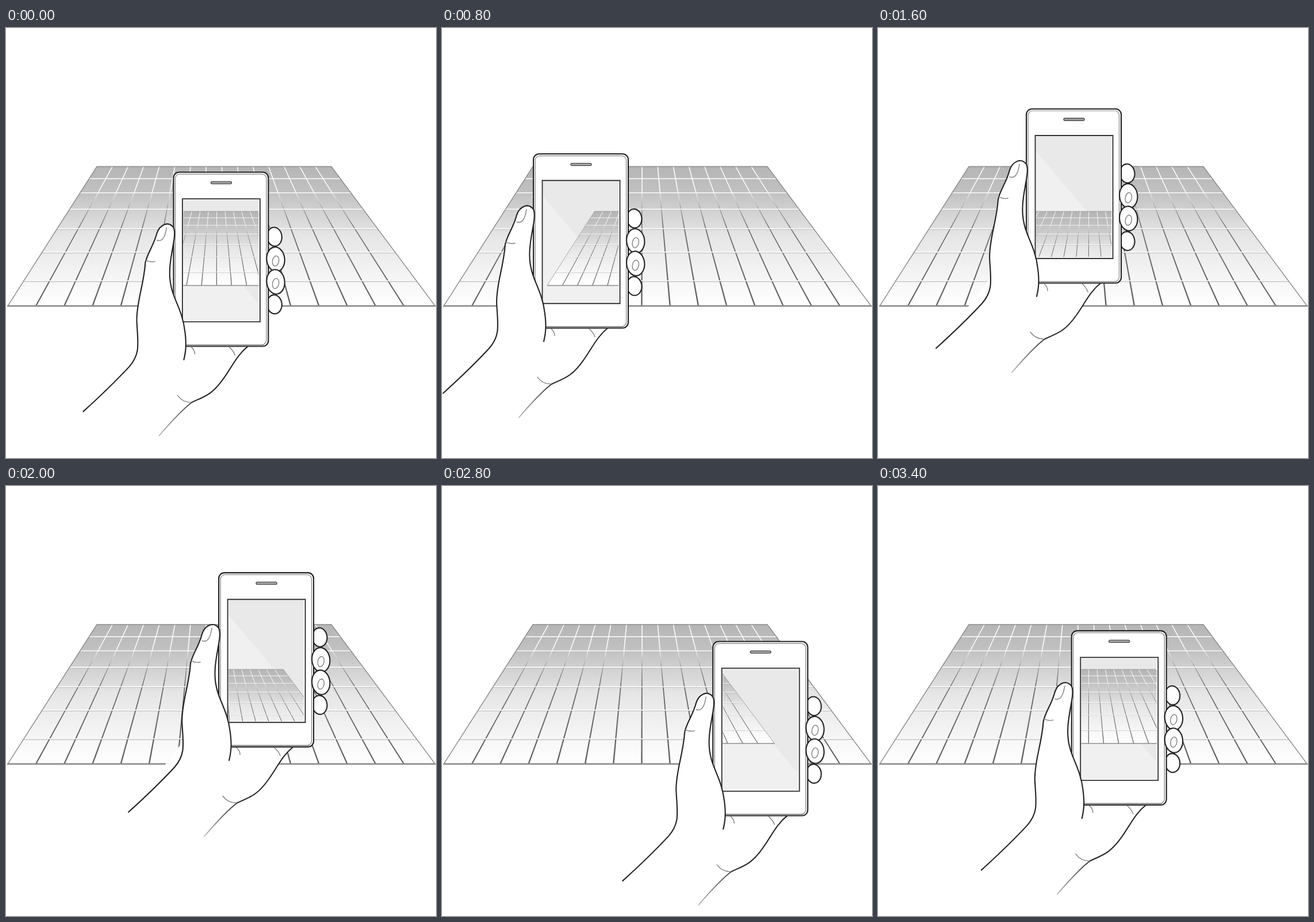
Write an HTML page with a canvas that moves like this. It is 748 px wide and 748 px high and loops after 3600 ms.

```html
<!DOCTYPE html>
<html lang="en">
<head>
<meta charset="utf-8">
<title>Phone over a floor grid</title>
<style>
html, body { margin: 0; width: 100%; height: 100%; overflow: hidden; background: #fff; }
canvas { display: block; width: 748px; height: 748px; }
</style>
</head>
<body>
<canvas id="stage" width="748" height="748"></canvas>
<script>
const ctx = document.getElementById('stage').getContext('2d');
const LOOP = 3600, STEP = 200;
const INK = '#222', GRAY = '#808080';

// The hand drifts on a closed curve: a mean plus cosine and sine harmonics.
const driftX = harmonics(22.1, [-14.2, -9.6, 7.4, -0.3, 1.1, -3.1], [-154, 16.2, 8.7, -2.3, -4.1, -1.5]);
const driftY = harmonics(-34.4, [60.6, -17.6, -8.9, 0.7, 1.8, 1.9], [-19.8, -1.4, 2.3, 4.5, 1.4, -2.1]);

function harmonics(mean, cosines, sines) {
  return angle => cosines.reduce((sum, c, i) =>
    sum + c * Math.cos((i + 1) * angle) + sines[i] * Math.sin((i + 1) * angle), mean);
}

const thumb = new Path2D(`M131 663 C152 644 185 613 211 585 C231 562 226 545 224 505
  C224 470 236 445 239 404 C243 386 253 376 259 353 C264 338 279 331 288 343
  C296 360 274 405 284 446 C288 468 304 488 308 525 C311 548 309 560 306 573`);
const palmCurve = 'C341 637 354 635 374 607 C390 585 398 565 418 549';
const palmEdge = new Path2D('M320 647' + palmCurve);
const wristEdge = new Path2D('M320 647 Q300 662 263 705');
const palm = new Path2D('M284 350 L226 540 131 663 263 705 Q300 662 320 647' + palmCurve + 'Z');
const creases = new Path2D(`M259 365 Q272 370 276 343 M240 400 Q248 404 256 402
  M319 551 Q325 556 325 563 M385 551 Q392 557 395 565 M295 635 Q304 647 318 647`);

function shape(path, fill, color, width) {
  if (fill) {
    ctx.fillStyle = fill;
    ctx.fill(path);
  }
  if (color) {
    ctx.strokeStyle = color;
    ctx.lineWidth = width;
    ctx.stroke(path);
  }
}

function polygon(...points) {
  return new Path2D('M' + points.join(' ') + 'Z');
}

function line(x1, y1, x2, y2, color, width) {
  shape(new Path2D(`M${x1} ${y1}L${x2} ${y2}`), null, color, width);
}

function roundRect(x, y, w, h, r) {
  const path = new Path2D();
  path.roundRect(x, y, w, h, r);
  return path;
}

function ellipse(x, y, rx, ry, tilt) {
  const path = new Path2D();
  path.ellipse(x, y, rx, ry, tilt, 0, 2 * Math.PI);
  return path;
}

function vertical(y1, y2, stops) {
  const gradient = ctx.createLinearGradient(0, y1, 0, y2);
  stops.forEach(([at, color]) => gradient.addColorStop(at, color));
  return gradient;
}

const TOP = 241, BOTTOM = 483.5, LEFT = 158, RIGHT = 566, COLUMNS = 15, ROWS = 6;
const tileShade = vertical(TOP, BOTTOM, [
  [0, '#b5b5b5'], [0.18, '#c1c1c1'], [0.5, '#e6e6e6'], [1, '#fff']
]);
const jointShade = vertical(TOP, BOTTOM, [
  [0, '#fff'], [0.17, '#f8f8f8'], [0.29, '#a6a6a6'], [0.45, '#707070'], [1, '#5c5c5c']
]);

function drawFloor() {
  const outline = polygon(LEFT, TOP, RIGHT, TOP, 746.5, BOTTOM, 3, BOTTOM);
  shape(outline, tileShade);
  for (let k = 1; k < COLUMNS; k++) {
    const far = LEFT + 27.15 * k, near = 2.7 + 49.25 * k;
    line(far, TOP, near + 1.6, BOTTOM, 'rgba(255,255,255,.4)', 1.6);
    shape(polygon(far - 0.7, TOP, far + 0.7, TOP, near + 1.2, BOTTOM, near - 1.2, BOTTOM), jointShade);
  }
  // Equal rows in perspective: the floor's width grows as 1 / distance.
  const width = RIGHT - LEFT;
  for (let j = 1; j <= ROWS; j++) {
    const t = (width / (1 - 0.0671 * j) - width) / 335.5;
    const y = TOP + t * (BOTTOM - TOP);
    const x1 = LEFT - 155 * t, x2 = RIGHT + 180.5 * t;
    line(x1, y + 1, x2, y + 1, `rgba(110,110,110,${0.7 * t})`, 1.6);
    line(x1, y, x2, y, '#fff', 1.6);
  }
  shape(outline, null, '#8c8c8c', 1.4);
  line(3, BOTTOM, 746.5, BOTTOM, '#8c8c8c', 2.4);
}

// The view on the screen stays fixed to the stage while the phone moves.
function drawScreen(dx, dy) {
  ctx.save();
  ctx.beginPath();
  ctx.rect(305, 294, 131, 211);
  ctx.clip();
  shape(roundRect(303, 293, 136, 215, 0), '#f0f0f0');
  shape(polygon(303, 293, 303, 318, 439, 479, 439, 293), '#e9e9e9');
  ctx.translate(183.4 - dx, 319 - dy);
  ctx.scale(0.531, 0.531);
  ctx.translate(-3, -TOP);
  drawFloor();
  ctx.restore();
}

function drawPhone(dx, dy) {
  shape(roundRect(288, 246.7, 165, 303, 10), '#fff', INK, 2.1);
  shape(roundRect(291, 250, 158.5, 297, 8), null, GRAY, 1.2);
  line(300, 548.4, 445, 548.4, GRAY, 2);
  shape(roundRect(353, 263, 36, 4, 2), '#aaa', '#444', 1.3);
  drawScreen(dx, dy);
  shape(roundRect(303.5, 293, 135, 214, 0), null, '#333', 1.9);
}

// The two middle fingertips are larger and wrap around the phone's edge.
function drawFinger(i) {
  const size = Math.sin(Math.PI * (i + 0.5) / 4);
  const x = 462 + 4 * size, y = 359 + 39.2 * i;
  shape(ellipse(x, y, 11 + 5 * size, 13 + 9 * size, -0.1), '#fff', INK, 2.1);
  if (size > 0.5) shape(ellipse(x, y + 3, 5.5, 9, 0.2), null, GRAY, 1.4);
}

function drawHand(dx, dy) {
  shape(palm, '#fff');
  shape(palmEdge, null, INK, 2);
  shape(wristEdge, null, vertical(647, 705, [[0, '#333'], [1, '#bbb']]), 1.8);
  [0, 3].forEach(drawFinger);
  drawPhone(dx, dy);
  [1, 2].forEach(drawFinger);
  shape(thumb, '#fff', INK, 2.1);
  shape(creases, null, GRAY, 1.4);
}

function draw(time) {
  const angle = 2 * Math.PI * Math.floor(time % LOOP / STEP) * STEP / LOOP;
  const dx = driftX(angle), dy = driftY(angle);
  ctx.clearRect(0, 0, 748, 748);
  drawFloor();
  ctx.save();
  ctx.translate(dx, dy);
  drawHand(dx, dy);
  ctx.restore();
}

ctx.lineCap = 'round';
let start;
function tick(now) {
  start ??= now;
  draw(now - start);
  requestAnimationFrame(tick);
}
draw(0);
requestAnimationFrame(tick);
</script>
</body>
</html>
```
